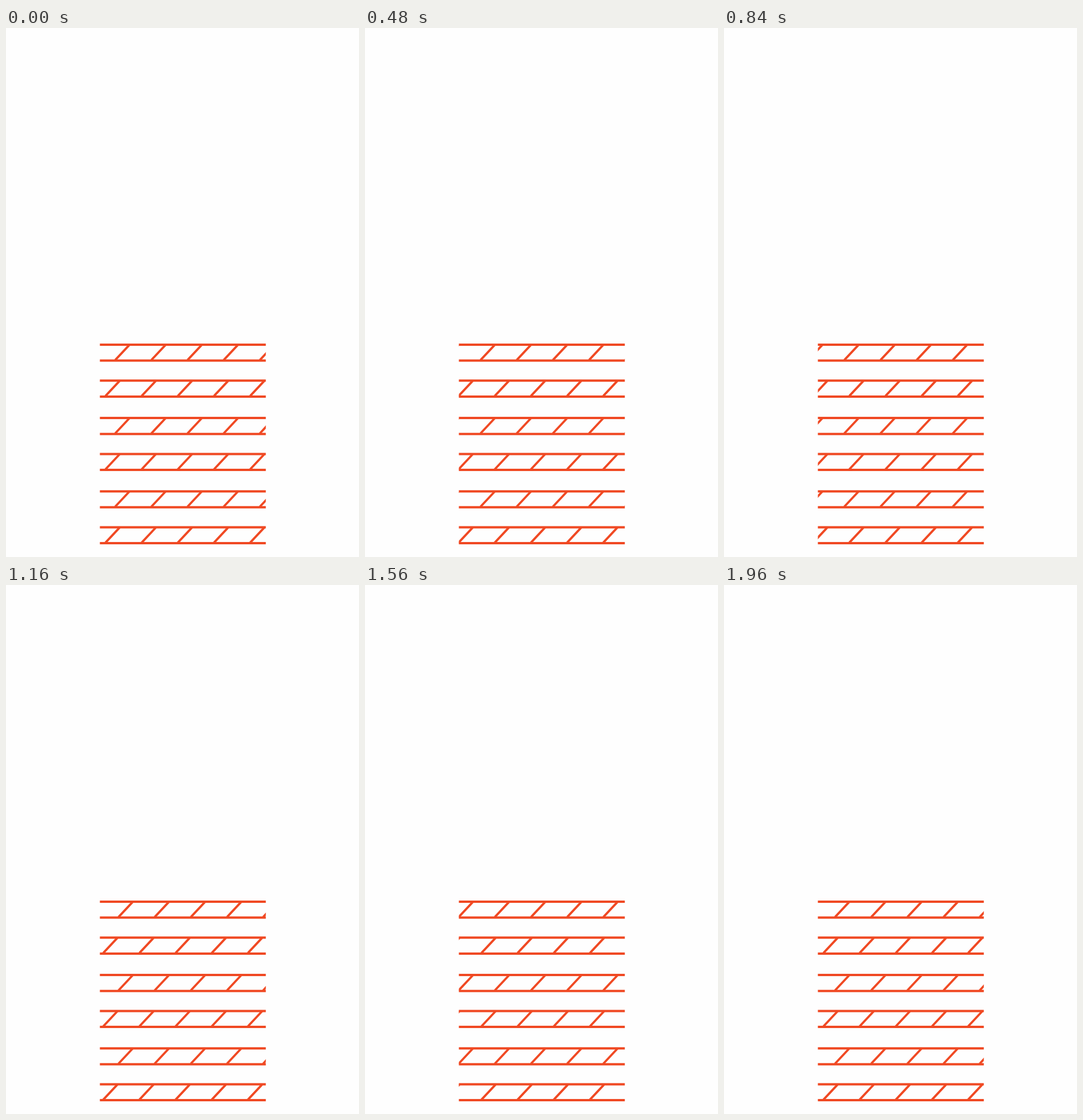
Animation, 611 px wide and 917 px high, one loop 2 s. Source, as an HTML page:

```html
<!DOCTYPE html>
<html lang="en">
<head>
<meta charset="utf-8">
<title>Moving belts</title>
<style>
  html, body { margin: 0; width: 100%; height: 100%; overflow: hidden; background: #fefefe; }
  svg { display: block; }
</style>
</head>
<body>
<svg id="stage" width="611" height="917" viewBox="0 0 611 917">
  <defs>
    <clipPath id="window"><rect x="162.5" y="540" width="287.2" height="362"/></clipPath>
  </defs>
  <g id="belts" clip-path="url(#window)" fill="none" stroke="#f04923" stroke-width="4"></g>
</svg>
<script>
const GAP = 62.6;        // distance between slats
const PITCH = 127.1;     // distance between belts of the same direction
const HEIGHT = 27.6;     // from rail to rail
const TICK = 40, TICKS = 50;

// Each direction: first rail, slat start, travel per tick
const lanes = [
  { y: 549, x: 189, step: (17 * GAP + 3.2) / 49 },
  { y: 611.3, x: 172.2, step: -17 * GAP / 49 }
];

const belts = document.getElementById('belts');

function addPath(d, width) {
  const path = document.createElementNS('http://www.w3.org/2000/svg', 'path');
  path.setAttribute('d', d);
  if (width) path.setAttribute('stroke-width', width);
  belts.appendChild(path);
  return path;
}

for (const lane of lanes) {
  let slats = '';
  for (let row = 0; row < 3; row++) {
    const y = lane.y + row * PITCH;
    addPath(`M162 ${y}H450M162 ${y + HEIGHT}H450`);
    for (let x = 100; x < 460; x += GAP) {
      slats += `M${x} ${y + HEIGHT - 1}l24.3 -26`;
    }
  }
  lane.slats = addPath(slats, 3.8);
}

function draw(time) {
  const tick = Math.floor(time / TICK) % TICKS;
  for (const { x, step, slats } of lanes) {
    const offset = x - 100 + tick * step;
    const shift = ((offset % GAP) + GAP) % GAP;
    slats.setAttribute('transform', `translate(${shift.toFixed(2)} 0)`);
  }
}

const start = performance.now();
function loop() {
  draw(performance.now() - start);
  requestAnimationFrame(loop);
}
loop();
</script>
</body>
</html>
```
